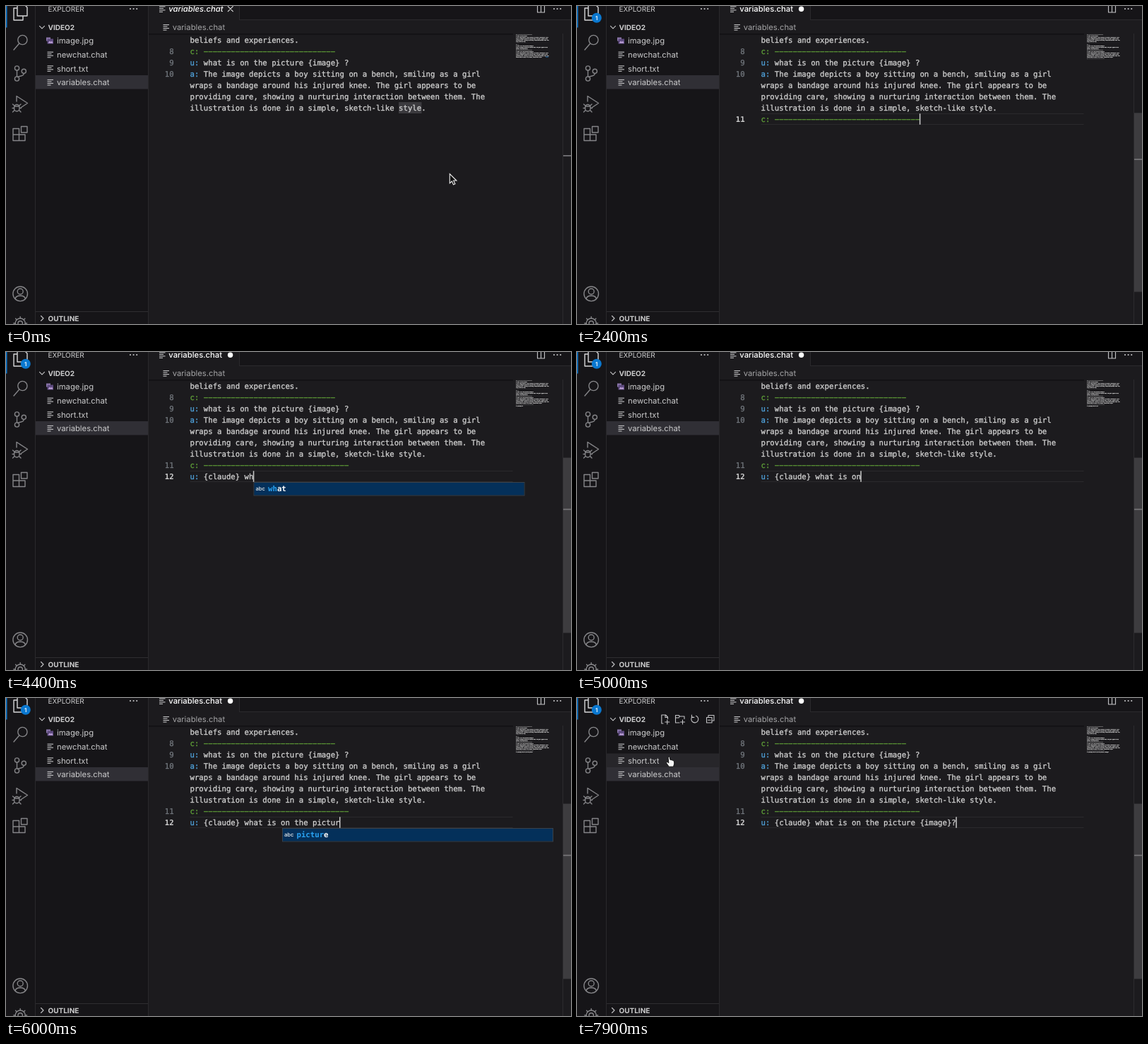
An HTML page for the animation above (8000 ms loop, 800x450 px).

```html
<!DOCTYPE html>
<html lang="en">
<head>
<meta charset="utf-8">
<title>Chat file editor</title>
<style>
html, body { margin: 0; width: 100%; height: 100%; overflow: hidden; background: #1c1b1e; }
svg { display: block; width: 800px; height: 450px; }
text { white-space: pre; text-rendering: geometricPrecision; }
.ui { font: 11.25px Inter, "Liberation Sans", sans-serif; fill: #cbcbcc; }
.head { font-size: 10px; }
.bold { font-weight: 700; }
.code { font: 10.68px "DejaVu Sans Mono", "Liberation Mono", monospace; fill: #d0d0d0; stroke: #d0d0d0; stroke-width: 0.3; }
.num { fill: #72777d; stroke: #72777d; text-anchor: end; }
.num.on { fill: #d0d0d0; stroke: none; font-weight: 700; }
.role { fill: #4fa0d8; stroke: #4fa0d8; }
.rule { fill: #5f9f38; stroke: #5f9f38; }
.hit { fill: #2aa4f4; stroke: none; font-weight: 700; }
.first { fill: #fff; stroke: none; font-weight: 700; }
.mini { font: bold 1.2px "DejaVu Sans Mono", monospace; fill: #e0e0e0; stroke: #e0e0e0; stroke-width: 0.22; }
.icon { fill: none; stroke: #858588; stroke-width: 1.4; stroke-linejoin: round; stroke-linecap: round; }
.thin { stroke: #c4c4c6; stroke-width: 1.1; }
</style>
</head>
<body>
<svg id="stage" viewBox="0 0 800 450" xmlns="http://www.w3.org/2000/svg"></svg>
<script>
const CHAR = 6.43, LEFT = 260.5, LINE = 16, TOP = 51.8;
const stage = document.getElementById("stage");

function add(tag, attrs, parent = stage, content = "") {
  const el = document.createElementNS("http://www.w3.org/2000/svg", tag);
  for (const key in attrs) el.setAttribute(key, attrs[key]);
  el.textContent = content;
  parent.appendChild(el);
  return el;
}
const group = (parent = stage) => add("g", {}, parent);
const rect = (x, y, width, height, fill, parent) => add("rect", { x, y, width, height, fill }, parent);
const text = (x, y, content, cls, parent) => add("text", { x, y, class: cls }, parent, content);
const icon = (d, cls = "", parent) => add("path", { d, class: "icon " + cls }, parent);
const show = (el, on) => el.setAttribute("display", on ? "inline" : "none");
const dots = (x, y) => [0, 4.6, 9.2].forEach(dx =>
  add("circle", { cx: x + dx, cy: y, r: 1.1, fill: "#c4c4c6" }));
const lines = (x, y) => [8.5, 6, 8.5, 5].forEach((w, i) =>
  rect(x, y - 4.2 + i * 2.5, w, 1.1, "#c0c0c2"));

// One line of code with its role prefix coloured once the colon is there.
function setLine(el, line) {
  el.textContent = "";
  const ruled = line.startsWith("c:");
  const cut = /^[uac]:/.test(line) ? 2 : 0;
  add("tspan", { class: ruled ? "rule" : "role" }, el, line.slice(0, cut));
  add("tspan", ruled ? { class: "rule" } : {}, el, line.slice(cut));
}

const rule = n => "c: " + "\u2212".repeat(n);
const prose = [
  "beliefs and experiences.",
  rule(29),
  "u: what is on the picture {image} ?",
  "a: The image depicts a boy sitting on a bench, smiling as a girl",
  "wraps a bandage around his injured knee. The girl appears to be",
  "providing care, showing a nurturing interaction between them. The",
  "illustration is done in a simple, sketch-like style."
];
const question = "u: {claude} what is on the picture {image}?";

// Panels
rect(0, 0, 800, 450, "#1c1b1e");
rect(0, 0, 201, 450, "#161518");
rect(41, 0, 1, 450, "#29282b");
rect(201, 0, 1, 450, "#29282b");
rect(330, 0, 470, 19, "#161518");
rect(330, 0, 1, 19, "#2b2a2d");
rect(330, 19, 470, 1, "#2b2a2d");
rect(202, 39, 516, 1.5, "#111013");
rect(788, 39, 1, 411, "#2c2b2e");
rect(42, 98, 159, 19.5, "#302f35");
const hover = rect(42, 78.5, 159, 19.5, "#27262a");
rect(42, 432, 159, 1, "#2f2e31");
rect(0, 0, 1.5, 30.5, "#0a78d0");

// Activity bar
icon("M16 -3H25L30 2V14H16ZM16 3H11V20H24V14").style.stroke = "#d6d6d8";
icon("M30 48A6.6 6.6 0 1 1 16.8 48A6.6 6.6 0 1 1 30 48M18.7 53L11 62");
icon("M15.5 91V99.5M25.3 95.5C25.3 100 19 98.5 16.5 100.5");
[[15.5, 88], [15.5, 103], [25.3, 92.3]].forEach(([cx, cy]) =>
  add("circle", { cx, cy, r: 3.1, class: "icon" }));
icon("M15 135V127.5L30.5 137.5L21.5 143.5M11.6 143.5A3.7 4 0 0 1 19 143.5V145A3.7 4 0 0 1 11.6 145ZM11.6 142H19M9.5 139L12 141M21 139L18.6 141M9 144.5H11.5M19 144.5H21.5M9.5 150L12 147.5M21 150L18.6 147.5");
icon("M10 173.5H18.5V190.5H10ZM10 182H27V190.5H18.5M27 182V190.5M21.5 170.5H30V179H21.5Z");
add("circle", { cx: 20.2, cy: 407.3, r: 10.3, class: "icon" });
add("circle", { cx: 20.2, cy: 404, r: 4, class: "icon" });
icon("M13 414.5C14 408.5 26.4 408.5 27.4 414.5");
add("circle", { cx: 20.2, cy: 449, r: 3.2, class: "icon" });
add("circle", { cx: 20.2, cy: 449, r: 7, class: "icon" });
for (let a = 0; a < 8; a++)
  icon("M20.2 442V439.6").setAttribute("transform", `rotate(${a * 45} 20.2 449)`);
const badge = group();
add("circle", { cx: 27.8, cy: 16.8, r: 7, fill: "#0a78d0" }, badge);
const one = text(27.8, 19.8, "1", "ui", badge);
one.setAttribute("style", "font-size:8px;font-weight:600;text-anchor:middle;fill:#fff");

// Explorer
text(59.5, 7.8, "EXPLORER", "ui head");
dots(176, 4);
icon("M47.5 28.3L51 31.8L54.5 28.3", "thin");
text(59.5, 33.6, "VIDEO2", "ui head bold");
icon("M49.5 438.5L53 442L49.5 445.5", "thin");
text(59.5, 445.8, "OUTLINE", "ui head bold");
["image.jpg", "newchat.chat", "short.txt", "variables.chat"].forEach((name, i) => {
  const y = 49.3 + i * 19.6;
  text(72, y + 4, name, "ui");
  if (i) lines(58.5, y);
});
rect(57, 44.5, 6, 5, "#8d78ad");
rect(58.5, 46.5, 8.5, 7, "#5d4a7e");
add("path", { d: "M59.5 52.5L62 49.5L63.5 51L65 49.5L66.5 52.5Z", fill: "#c3a6dd" });
const tools = group();
icon("M122 36H119.8V24H125.5L128.5 27V29.5M125 24V27.5H128.5M127.8 31V37M124.8 34H130.8", "thin", tools);
icon("M145 35H139.5V24.5H144L145.5 26H152V29.5M139.5 28H144L145.5 26M149.5 31V37M146.5 34H152.5", "thin", tools);
icon("M163 26.6A5 5 0 1 0 168.5 25.2M162.4 24V27.4H165.8", "thin", tools);
icon("M186 27.5V24.5H194V32H191M183.5 27.5H191V35H183.5ZM185.5 31.3H189", "thin", tools);

// Tab and breadcrumb
lines(217, 4.5);
const title = text(230.3, 8.4, "variables.chat", "ui");
title.style.fill = "#fff";
title.style.fontWeight = 500;
const closer = icon("M314.3 0.7L321.3 7.7M321.3 0.7L314.3 7.7", "thin");
closer.style.stroke = "#e6e6e6";
const unsaved = add("circle", { cx: 317.6, cy: 4.2, r: 3.7, fill: "#fff" });
lines(222.5, 30.2);
text(235.7, 33.9, "variables.chat", "ui").style.fill = "#a4a4a6";
icon("M752.5 -2H762.5V9H752.5ZM757.5 -2V9", "thin");
dots(776, 4);

// Editor
const wordMark = rect(556, 136, 32.5, 16, "#3b3a3e");
const active = group();
rect(LEFT, 0, 457, 1, "#2b2a2d", active);
rect(LEFT, 15, 457, 1, "#2b2a2d", active);
prose.forEach((line, i) => setLine(text(LEFT, TOP + i * LINE, "", "code"), line));
const numbers = [8, 9, 10, 11, 12].map((n, i) =>
  text(237.7, TOP + [1, 2, 3, 7, 8][i] * LINE, n, "code num"));
const ruleLine = text(LEFT, TOP + 7 * LINE, "", "code");
const askLine = text(LEFT, TOP + 8 * LINE, "", "code");
const caret = rect(0, 0, 1.5, 15.5, "#c8c8c8");

// Minimap and scrollbar
const filler = [prose[1], "u: what are the words?", prose[3], prose[4], prose[5],
  "a boy with his knee", "", "c: ---", prose[2], prose[4]];
[...filler, ...prose].forEach((line, i) => text(722, 41 + i * 2, line, "mini"));
const miniRule = text(722, 75, "", "mini");
const miniAsk = text(722, 77, "", "mini");
miniRule.style.opacity = 0.6;
const miniMark = rect(764, 71.5, 4, 1, "#2d79b5");
const slider = rect(789, 0, 11, 0, "#3d3c3f");
const ruler = rect(789, 0, 11, 1.7, "#777679");

// Suggestion list
const popup = group();
const WIDE = 383, ROW = 16.5;
let popupKey = "";
function drawPopup(spec, typed) {
  const key = spec ? spec.words.join() + typed : "";
  if (key === popupKey) return;
  popupKey = key;
  popup.textContent = "";
  if (!spec) return;
  const x = Math.min(LEFT + spec.col * CHAR + 0.5, 391.5), y = spec.row * LINE + 56.5;
  const box = rect(x, y, WIDE, spec.words.length * ROW + 2, "#201f22", popup);
  box.setAttribute("stroke", "#39424c");
  rect(x + 0.5, y + 0.5, WIDE - 1, ROW + 1, "#04305a", popup);
  spec.words.forEach((word, i) => {
    const base = y + 12.3 + i * ROW;
    const tag = text(x + 2.5, base - 0.4, "abc", "ui", popup);
    tag.setAttribute("style", "font-size:7.6px;font-weight:500;fill:#f0f0f0");
    const label = text(x + 20, base, "", "code", popup);
    add("tspan", { class: "hit" }, label, word.slice(0, typed));
    add("tspan", i ? {} : { class: "first" }, label, word.slice(typed));
  });
}

// from/to in ms, column of the list, row of the line, first column of the typed word
const popups = [
  { from: 1300, to: 1500, col: 1, row: 7, start: 0, words: ["care", "can", "common", "culture"] },
  { from: 2900, to: 3000, col: 1, row: 8, start: 0, words: ["u", "us", "used", "under"] },
  { from: 3500, to: 3600, col: 5, row: 8, start: 4, words: ["care", "can", "common", "culture"] },
  { from: 4400, to: 4600, col: 14, row: 8, start: 12, words: ["what"] },
  { from: 4900, to: 5000, col: 21, row: 8, start: 20, words: ["on", "of", "or", "other", "one"] },
  { from: 5500, to: 5700, col: 28, row: 8, start: 27,
    words: ["picture", "people", "personal", "place", "point", "providing"] },
  { from: 5700, to: 6100, col: 28, row: 8, start: 27, words: ["picture"] },
  { from: 6600, to: 7100, col: 37, row: 8, start: 36, words: ["image"] }
];

// Pointers
const arrow = add("path", {
  d: "M0 0V13.2L3 10.4L5.2 15.2L7.6 14.1L5.4 9.4H9.6Z",
  fill: "#111", stroke: "#eee", "stroke-width": 1.1
});
const hand = add("path", {
  d: "M-3 -6.5Q-1.8 -7.8 -0.8 -6.2L0 -2.5Q1.2 -3.2 2 -2Q3.2 -2.6 3.9 -1.4Q5.2 -1.6 5.6 0L5.8 3L4.5 7.2H-1.8L-5.6 1.8Q-5.6 0 -3.8 0.7L-2.2 2Z",
  fill: "#f4f4f4", stroke: "#111", "stroke-width": 1
});

// Piecewise linear value through [time, value] points.
function along(points, t) {
  if (t < points[0][0]) return 0;
  for (let i = 1; i < points.length; i++) {
    const [t0, a] = points[i - 1], [t1, b] = points[i];
    if (t < t1) return a + (b - a) * (t - t0) / (t1 - t0);
  }
  return points[points.length - 1][1];
}
const typing = [[2800, 1], [3000, 2], [3300, 4], [4100, 12], [4200, 12], [4400, 14], [5400, 28],
  [5500, 28], [6200, 35], [6500, 36], [6800, 38], [7200, 42], [7400, 42], [7500, 43]];
const ruling = [[1300, 1], [1500, 2], [1700, 3], [1800, 4], [1900, 5], [2400, 35]];
const count = (points, t) => Math.floor(along(points, t) + 1e-6);

function draw(time) {
  const t = Math.floor(time / 100) * 100;
  const focused = t >= 300, edited = t >= 700;
  const row = t >= 2600 ? 8 : edited ? 7 : 6;
  const ruleLen = count(ruling, t), askLen = count(typing, t);
  const col = row === 8 ? askLen : row === 7 ? ruleLen : prose[6].length;

  show(badge, t >= 800);
  show(unsaved, edited);
  show(closer, !edited);
  title.style.fontStyle = edited ? "normal" : "italic";
  show(wordMark, !focused);
  show(miniMark, !focused);
  show(active, focused);
  active.setAttribute("transform", `translate(0 ${40 + row * LINE})`);
  show(caret, focused);
  caret.setAttribute("x", LEFT + col * CHAR - 0.7);
  caret.setAttribute("y", 40.3 + row * LINE);
  numbers.forEach((el, i) => {
    show(el, i < 3 || i <= row - 4);
    el.classList.toggle("on", focused && i === row - 4);
  });

  const dashes = rule(32).slice(0, ruleLen), asked = question.slice(0, askLen);
  setLine(ruleLine, dashes);
  setLine(askLine, asked);
  miniRule.textContent = dashes;
  miniAsk.textContent = asked;

  const spec = popups.find(p => t >= p.from && t < p.to);
  drawPopup(spec, spec ? Math.max(1, (spec.row === 8 ? askLen : ruleLen) - spec.start) : 0);

  const [top, bottom, mark] = [[153, 413, 211], [151.3, 404.5, 216.2], [149.6, 397.5, 221.8]][row - 6];
  show(slider, t >= 200);
  slider.setAttribute("y", top);
  slider.setAttribute("height", bottom - top);
  ruler.setAttribute("y", mark);

  const moving = t >= 7600;
  const p = Math.min(1, Math.max(0, (t - 7600) / 300)), e = 1 - (1 - p) ** 2;
  const x = 330 - 198 * e, y = 150 - 60 * e, inSide = x < 201;
  show(hand, moving && inSide);
  hand.setAttribute("transform", `translate(${x} ${y})`);
  show(arrow, !edited || (moving && !inSide));
  arrow.setAttribute("transform", moving ? `translate(${x} ${y})` : "translate(628.3 237.6)");
  show(tools, moving && inSide);
  show(hover, moving && inSide && y < 98);
}

const begin = performance.now();
function tick() {
  draw((performance.now() - begin) % 8000);
  requestAnimationFrame(tick);
}
tick();
</script>
</body>
</html>
```
